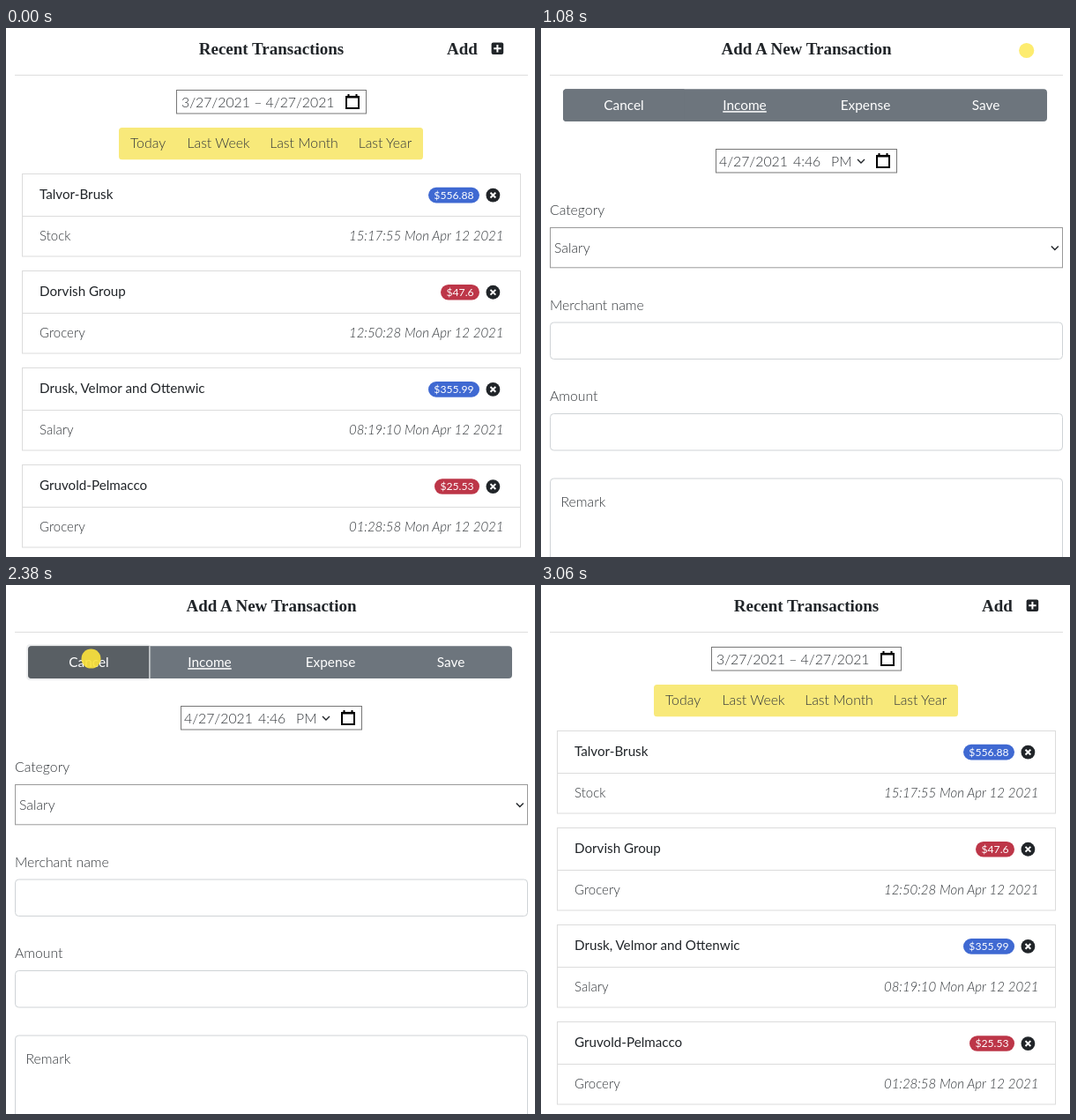
Recreate the animation shown at these times as an HTML page. Size 600 by 600 pixels, loop 3130 ms.

```html
<!DOCTYPE html>
<html lang="en">
<head>
<meta charset="utf-8">
<title>Transactions</title>
<style>
  html, body { margin: 0; width: 100%; height: 100%; overflow: hidden; background: #fff; }
  svg { display: block; width: 100vw; height: 100vh; }
  text { font-family: Lato, sans-serif; font-weight: 300; font-size: 15.8px; fill: #33373b; }
  .title { font: bold 19px "Liberation Serif", serif; fill: #212529; }
  .name { font-weight: 400; font-size: 15.2px; fill: #212529; }
  .small { font-size: 15px; }
  .date { font-style: italic; font-size: 15px; }
  .badge { font-weight: 400; font-size: 12.2px; fill: #fff; }
  .tab { fill: #fff; font-weight: 400; font-size: 15.4px; }
</style>
</head>
<body>
<svg id="stage" viewBox="0 0 600 600"></svg>
<script>
const LOOP = 3130;
const INK = '#212529', BLUE = '#3f69d2', RED = '#bd3648';

const text = (x, y, str, cls = '', anchor = 'start', extra = '') =>
  `<text x="${x}" y="${y}" class="${cls}" text-anchor="${anchor}" ${extra}>${str}</text>`;
const box = (x, y, w, h, stroke, r = 0, fill = 'none') =>
  `<rect x="${x}" y="${y}" width="${w}" height="${h}" rx="${r}" fill="${fill}" stroke="${stroke}"/>`;
const path = (d, stroke, width = 1) =>
  `<path d="${d}" fill="none" stroke="${stroke}" stroke-width="${width}"/>`;
const header = title =>
  text(301, 30, title, 'title', 'middle') + path('M10 53.5H592', '#dedede');
const calendar = (x, y) =>
  path(`M${x + 1} ${y + 3}h14v13h-14z`, '#000', 2) +
  path(`M${x + 1} ${y + 3.2}h14`, '#000', 2.6) +
  path(`M${x + 3.5} ${y}v3M${x + 12.5} ${y}v3`, '#000', 2);
const chevron = (x, y) => path(`M${x - 4} ${y - 2}l4 4l4-4`, INK, 1.4);

function card([name, category, amount, color, date], i) {
  const y = 165.2 + i * 110.15;
  const width = amount.length > 6 ? 58 : amount.length > 5 ? 51 : 44;
  return box(18.5, Math.floor(y) + .5, 565, 93.5, '#dcdcdc') +
    path(`M18 ${Math.floor(y + 47.8) + .5}H584`, '#dcdcdc') +
    text(38, y + 28.5, name, 'name') +
    `<rect x="${537 - width}" y="${y + 15.6}" width="${width}" height="17.6" rx="8.8" fill="${color}"/>` +
    text(537 - width / 2, y + 28.7, amount, 'badge', 'middle') +
    `<circle cx="552.4" cy="${y + 24.4}" r="7.9" fill="${INK}"/>` +
    path(`M549.5 ${y + 21.5}l5.8 5.8m0-5.8l-5.8 5.8`, '#fff', 2) +
    text(38, y + 75.8, category, 'small') +
    text(564.5, y + 75.8, date, 'date', 'end');
}

const rows = [
  ['Talvor-Brusk', 'Stock', '$556.88', BLUE, '15:17:55 Mon Apr 12 2021'],
  ['Dorvish Group', 'Grocery', '$47.6', RED, '12:50:28 Mon Apr 12 2021'],
  ['Drusk, Velmor and Ottenwic', 'Salary', '$355.99', BLUE, '08:19:10 Mon Apr 12 2021'],
  ['Gruvold-Pelmacco', 'Grocery', '$25.53', RED, '01:28:58 Mon Apr 12 2021'],
];
const ranges = [['Today', 161], ['Last Week', 241], ['Last Month', 338], ['Last Year', 430]];

const listPage = header('Recent Transactions') +
  text(500, 30, 'Add', 'title') +
  `<rect x="550.6" y="16.6" width="13.6" height="13.4" rx="2" fill="${INK}"/>` +
  path('M553.2 23.3h8.4M557.4 19.1v8.4', '#fff', 2) +
  box(193.5, 70.5, 215, 26.5, '#777') +
  text(199, 89.5, '3/27/2021 – 4/27/2021') + calendar(385, 75) +
  '<rect x="128" y="113" width="345" height="36.3" rx="3.5" fill="#f8e97a"/>' +
  ranges.map(([label, x]) => text(x, 136.4, label, '', 'middle')).join('') +
  rows.map(card).join('');

const formPage = header('Add A New Transaction') +
  '<rect x="25" y="69.3" width="549" height="36.7" rx="4" fill="#6d757d"/>' +
  '<rect id="ring" x="23.2" y="67.2" width="141" height="40.9" rx="4" fill="#cbced1"/>' +
  '<path id="cancel" d="M162.5 69.3H29q-4 0-4 4v28.7q0 4 4 4h133.5z"/>' +
  '<path id="divider" d="M162.8 69.3v36.7" stroke="#e8eaeb"/>' +
  text(94, 93.2, 'Cancel', 'tab', 'middle') +
  text(231, 93.2, 'Income', 'tab', 'middle', 'text-decoration="underline"') +
  text(368, 93.2, 'Expense', 'tab', 'middle') +
  text(504.5, 93.2, 'Save', 'tab', 'middle') +
  box(198.5, 137.5, 205, 26.5, '#777') +
  text(202, 156.5, '4/27/2021') + text(286, 156.5, '4:46') + text(329, 156.5, 'PM') +
  chevron(363, 151) + calendar(380, 142) +
  text(10, 212.2, 'Category') +
  box(10.5, 226.5, 581, 45.3, '#9a9a9a') + text(15, 255, 'Salary') + chevron(582.8, 249.5) +
  text(10, 319.5, 'Merchant name') + box(10.5, 334, 581, 41.5, '#cfd3d6', 4) +
  text(10, 423.2, 'Amount') + box(10.5, 437.5, 581, 41.5, '#cfd3d6', 4) +
  box(10.5, 511, 581, 110, '#cfd3d6', 4) + text(22.5, 543.2, 'Remark');

document.getElementById('stage').innerHTML =
  `<g id="list">${listPage}</g><g id="form">${formPage}</g><circle id="tap"/>`;
const part = Object.fromEntries(
  ['list', 'form', 'ring', 'cancel', 'divider', 'tap'].map(id => [id, document.getElementById(id)]));

// Returns the value of the last step that has started.
const stepAt = (steps, t) => steps.reduce((value, [start, next]) => t >= start ? next : value, null);

const BAR = '#6d757d';
const cancelFill = [[0, BAR], [1760, '#686f76'], [1830, '#62696f'], [1900, '#5d6468'], [2380, '#595f64'], [2440, '#565b60']];
const ringOpacity = [[0, 0], [2380, .35], [2440, .75], [2500, 1]];
const dividerOpacity = [[0, 0], [1760, .35], [1830, .7], [1900, 1]];
// Each tap: [x, y, radius, colour, opacity]
const tapAt = (x, y) => (r, color, opacity) => [x, y, r, color, opacity];
const add = tapAt(550.7, 25.5), cancel = tapAt(96.5, 83.6);
const PRESS = '#fae23c', RELEASE = '#fdec6f';
const taps = [
  [840, add(11, PRESS, .92)], [920, add(11.5, PRESS, 1)],
  [1080, add(8.6, RELEASE, 1)], [1140, null],
  [2380, cancel(11, PRESS, .92)], [2440, cancel(11.5, PRESS, 1)],
  [2580, cancel(8.6, RELEASE, 1)], [2640, null],
];

function render(t) {
  const onForm = t >= 1080 && t < 2580;
  part.list.style.display = onForm ? 'none' : '';
  part.form.style.display = onForm ? '' : 'none';
  part.cancel.setAttribute('fill', stepAt(cancelFill, t));
  part.ring.setAttribute('opacity', stepAt(ringOpacity, t));
  part.divider.setAttribute('opacity', stepAt(dividerOpacity, t));
  const [cx, cy, r, fill, opacity] = stepAt(taps, t) || [0, 0, 0, 'none', 0];
  for (const [key, value] of Object.entries({ cx, cy, r, fill, opacity })) part.tap.setAttribute(key, value);
}

const start = performance.now();
function tick() {
  render((performance.now() - start) % LOOP);
  requestAnimationFrame(tick);
}
tick();
</script>
</body>
</html>
```
